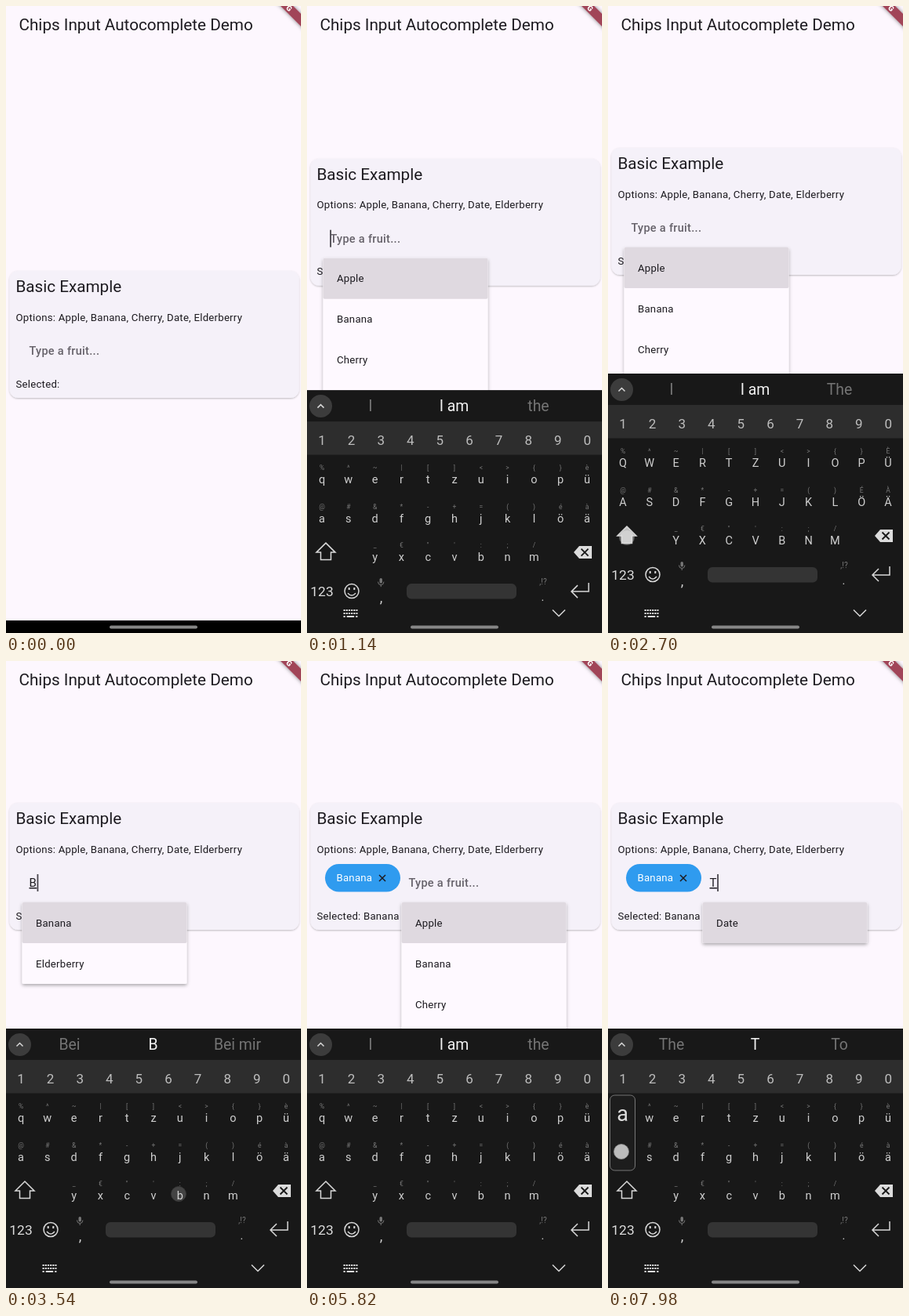
Animation, 376 px wide and 800 px high, one loop 8 s. Source, as an HTML page:

```html
<!DOCTYPE html>
<html lang="en">
<head>
<meta charset="utf-8">
<title>Chips Input Autocomplete Demo</title>
<style>
  html, body { margin: 0; width: 100%; height: 100%; overflow: hidden; background: #fdf7fe; }
  svg { display: block; width: 376px; height: 800px; font-family: Roboto, sans-serif; }
  text { white-space: pre; }
  .title { font-size: 20.7px; fill: #1d1b20; }
  .body { font-size: 13.2px; letter-spacing: .235px; fill: #1d1b20; }
  .hint { font-size: 14.5px; font-weight: 500; letter-spacing: .3px; fill: #66626a; }
  .input { font-size: 15px; letter-spacing: .47px; fill: #1d1b20; text-decoration: underline; }
  .mid { text-anchor: middle; }
  .key { font-size: 14.5px; fill: #cfcfcf; }
  .num { font-size: 17px; fill: #bdbdbd; }
  .alt { font-size: 8.5px; fill: #777; }
  .word { font-size: 19.4px; fill: #747474; }
  .word.best { fill: #f2f2f2; }
  .icon { fill: none; stroke: #d8d8d8; stroke-width: 1.5; }
</style>
</head>
<body>
<svg viewBox="0 0 376 800">
  <defs>
    <filter id="cardShadow" x="-5%" y="-5%" width="110%" height="112%">
      <feDropShadow dx="0" dy="1" stdDeviation="1" flood-opacity=".25"/>
    </filter>
    <filter id="menuShadow" x="-10%" y="-10%" width="120%" height="125%">
      <feDropShadow dx="0" dy="2" stdDeviation="2" flood-opacity=".32"/>
    </filter>
    <filter id="bannerShadow" x="-40%" y="-40%" width="180%" height="180%">
      <feDropShadow dx="0" dy="0" stdDeviation="2.6" flood-opacity=".5"/>
    </filter>
    <clipPath id="keyArea"><rect width="376" height="764"/></clipPath>
    <clipPath id="menuClip"><rect id="menuClipBox" y="308" width="210"/></clipPath>
  </defs>

  <rect width="376" height="800" fill="#fdf7fe"/>
  <text class="title" x="16.5" y="31">Chips Input Autocomplete Demo</text>

  <g id="card">
    <rect x="4.5" y="181" width="369" height="162" rx="11" fill="#f5f1f9" filter="url(#cardShadow)"/>
    <text class="title" x="12.4" y="208">Basic Example</text>
    <text class="body" x="12.5" y="244.5">Options: Apple, Banana, Cherry, Date, Elderberry</text>
    <text class="body" x="12.5" y="329.5" id="selected"></text>
    <g id="chip">
      <rect x="23" y="259" width="96" height="35.5" rx="17.7" fill="#2f9bef"/>
      <text class="body" x="37.5" y="281" style="fill:#fff">Banana</text>
      <path d="M92 273l8 8m0-8l-8 8" stroke="#1d1b20" stroke-width="1.5"/>
    </g>
    <text class="hint" y="288" id="hint">Type a fruit...</text>
    <text class="input" y="288" id="input"></text>
    <rect y="272" width="1.8" height="22" fill="#4a474e" id="cursor"/>
    <g id="menu">
      <rect y="308" width="210" rx="2" fill="#fef9ff" filter="url(#menuShadow)" id="menuBox"/>
      <rect y="308" width="210" height="52" rx="2" fill="#dfd9e0"/>
      <g id="menuItems" clip-path="url(#menuClip)"></g>
    </g>
  </g>

  <g filter="url(#bannerShadow)"><path d="M342-8L382 32V16L358-8Z" fill="#a14558"/></g>
  <text class="mid" transform="translate(361 3) rotate(45)" y="3.3" font-size="9.5" font-weight="900" fill="#fff">G</text>

  <rect y="784" width="376" height="16"/>
  <g clip-path="url(#keyArea)">
    <g id="board">
      <rect y="469" width="376" height="341" fill="#181818"/>
      <rect y="509" width="376" height="42.5" fill="#2d2d2d"/>
      <circle cx="17.5" cy="489.5" r="14.5" fill="#3c3c3c"/>
      <path class="icon" d="M13.5 491.5l4-4 4 4"/>
      <g id="keys"></g>
      <path class="icon" id="shift" d="M24 664L36 676H30.5V685.5H17.5V676H12Z"/>
      <path d="M347 668h16v16h-16l-7-8z" fill="#dcdcdc"/>
      <path d="M349.5 671.5l9 9m0-9l-9 9" stroke="#181818" stroke-width="1.8"/>
      <text class="num mid" x="19" y="732" style="font-size:17.4px;fill:#dcdcdc">123</text>
      <circle class="icon" cx="57" cy="725.5" r="9"/>
      <path class="icon" d="M52 728q5 6 10 0"/>
      <path d="M53.7 721v3m6.6-3v3" stroke="#d8d8d8" stroke-width="2"/>
      <rect x="92.5" y="709" width="3.4" height="6.5" rx="1.7" fill="#777"/>
      <path d="M90.5 713.5q0 4 3.7 4t3.7-4M94.2 717.5v2.5" fill="none" stroke="#777"/>
      <text class="key mid" x="94.5" y="740" style="font-size:18px">,</text>
      <rect x="127" y="716" width="140" height="19.5" rx="6" fill="#343434"/>
      <text class="alt mid" x="301" y="717" style="font-size:10px">,!?</text>
      <text class="key mid" x="300.5" y="738">.</text>
      <path class="icon" d="M359 715v11h-22m8-8l-8 8 8 8"/>
    </g>
  </g>
  <g id="nav">
    <rect y="764" width="376" height="36" fill="#181818"/>
    <path d="M46.5 771h18m-18 4h18" stroke="#dcdcdc" stroke-width="2.2" stroke-dasharray="2.2 1"/>
    <path d="M46.5 779h2.2m2 0h9.5m2 0h2.2" stroke="#dcdcdc" stroke-width="2"/>
    <path class="icon" d="M313 770.5l8 8 8-8"/>
  </g>
  <rect x="132" y="790.5" width="112" height="4" rx="2" fill="#868686"/>

  <g id="preview">
    <rect x="-16" y="-79" width="32" height="96" rx="6" fill="#1d1d1d" stroke="#777"/>
    <text class="mid" y="-46" font-size="27" fill="#dcdcdc"></text>
  </g>
  <circle id="dot" r="9.5" fill="#e4e4e4" stroke="#aaa" stroke-width=".8"/>
</svg>

<script>
const LOOP = 8000;
const $ = id => document.getElementById(id);

function addText(parent, cls, x, y, str) {
  const el = document.createElementNS('http://www.w3.org/2000/svg', 'text');
  el.setAttribute('class', cls);
  el.setAttribute('x', x);
  el.setAttribute('y', y);
  el.textContent = str;
  parent.append(el);
  return el;
}
const setText = (el, str) => { if (el.textContent !== str) el.textContent = str; };
const show = (el, on) => { el.style.display = on ? '' : 'none'; };
const move = (el, x, y) => el.setAttribute('transform', `translate(${x} ${y})`);

// Keyboard
const STEP = 33.8;
const keys = [];
[...'1234567890'].forEach((c, i) => addText($('keys'), 'num mid', 19 + i * 37.6, 539, c));
[
  ['qwertzuiopü', '%^~|[]<>{}è', 588, 0],
  ['asdfghjklöä', '@#&*-+=()éà', 637.5, 0],
  ['yxcvbnm', '_€"\':;/', 687, 2]
].forEach(([letters, alts, y, col]) => {
  [...letters].forEach((c, i) => {
    const x = 19 + (i + col) * STEP;
    keys.push([addText($('keys'), 'key mid', x, y, c), c]);
    keys.push([addText($('keys'), 'alt mid', x, y - 17, alts[i]), alts[i]]);
  });
});
const words = [81, 187.5, 295].map((x, i) =>
  addText($('keys'), i === 1 ? 'word best mid' : 'word mid', x, 496, ''));
const items = [0, 1, 2, 3].map(i => addText($('menuItems'), 'body', 17.5, 338.5 + i * 52, ''));

// Each state: start, input, chip shown, capitals, suggestions, menu
const ALL = 'Apple,Banana,Cherry,Date';
const states = [
  [0, '', 0, 0, 'I,I am,the', ''],
  [980, '', 0, 0, 'I,I am,the', ALL],
  [2460, '', 0, 1, 'I,I am,The', ALL],
  [3420, 'B', 0, 0, 'Bei,B,Bei mir', 'Banana,Elderberry'],
  [4740, 'Ba', 0, 0, 'Ba,BA,Bahn', 'Banana'],
  [5340, '', 1, 0, 'I,I am,the', ALL],
  [6840, '', 1, 1, 'I,I am,The', ALL],
  [7560, 'T', 1, 0, 'The,T,To', 'Date']
];
// Each touch: down, up, x, y, previewed letter, key centre
const touches = [
  [660, 820, 75, 440],
  [2400, 2640, 24, 678],
  [3240, 3420, 220, 680, 'B', 222, 682],
  [4620, 4740, 17, 626, 'a', 18.5, 633],
  [4800, 5340, 66, 334],
  [6760, 7040, 24, 678],
  [7440, 7560, 154, 580, 'T', 154, 583],
  [7900, 8100, 17, 626, 'a', 18.5, 633]
];
const blinkStarts = [920, 3420, 4850, 7560];
const FADE = 180;

const lastBefore = (list, t, start) => list.filter(e => start(e) <= t).pop();
const slide = t => 1 - (1 - Math.min(1, Math.max(0, (t - 963) / 300))) ** 3;

function drawField(t, [, input, chip, , , menu]) {
  const x = chip ? 129.5 : 29.5;
  show($('chip'), chip);
  setText($('selected'), chip ? 'Selected: Banana' : 'Selected:');
  $('hint').setAttribute('x', x);
  show($('hint'), !input);
  $('input').setAttribute('x', x);
  setText($('input'), input);
  const blink = lastBefore(blinkStarts, t, e => e);
  show($('cursor'), blink && Math.floor((t - blink) / 500) % 2 === 0);
  $('cursor').setAttribute('x', x - .3 + (input ? $('input').getComputedTextLength() + .5 : 0));

  const names = menu ? menu.split(',') : [];
  const height = Math.min(188, names.length * 52);
  show($('menu'), names.length);
  move($('menu'), chip ? 120.5 : 20.5, 0);
  $('menuBox').setAttribute('height', height);
  $('menuClipBox').setAttribute('height', height);
  items.forEach((el, i) => setText(el, names[i] || ''));
}

function drawKeyboard(t, [, , , caps, suggestions]) {
  const p = slide(t);
  move($('board'), 0, 314 * (1 - p));
  show($('board'), p > 0);
  $('nav').style.opacity = Math.min(1, p * 1.2);
  keys.forEach(([el, c]) => setText(el, caps ? c.toUpperCase() : c));
  $('shift').style.fill = caps ? '#c4c4c4' : 'none';
  suggestions.split(',').forEach((w, i) => setText(words[i], w));
}

function drawTouch(t) {
  const touch = lastBefore(touches, t, e => e[0]);
  const [, up, x, y, letter, kx, ky] = touch || [0, -FADE, 0, 0];
  const alpha = Math.max(0, Math.min(1, 1 - (t - up) / FADE));
  const preview = letter && t < up;
  move($('dot'), x, y);
  $('dot').style.opacity = alpha * (preview ? .8 : .65);
  show($('preview'), preview);
  if (preview) {
    move($('preview'), kx, ky);
    setText($('preview').lastElementChild, letter);
  }
}

function draw(now) {
  const t = now % LOOP;
  const state = lastBefore(states, t, e => e[0]);
  move($('card'), 0, 157 * (1 - slide(t - 11)));
  drawField(t, state);
  drawKeyboard(t, state);
  drawTouch(t);
}

const begin = performance.now();
function tick() {
  draw(performance.now() - begin);
  requestAnimationFrame(tick);
}
tick();
</script>
</body>
</html>
```
